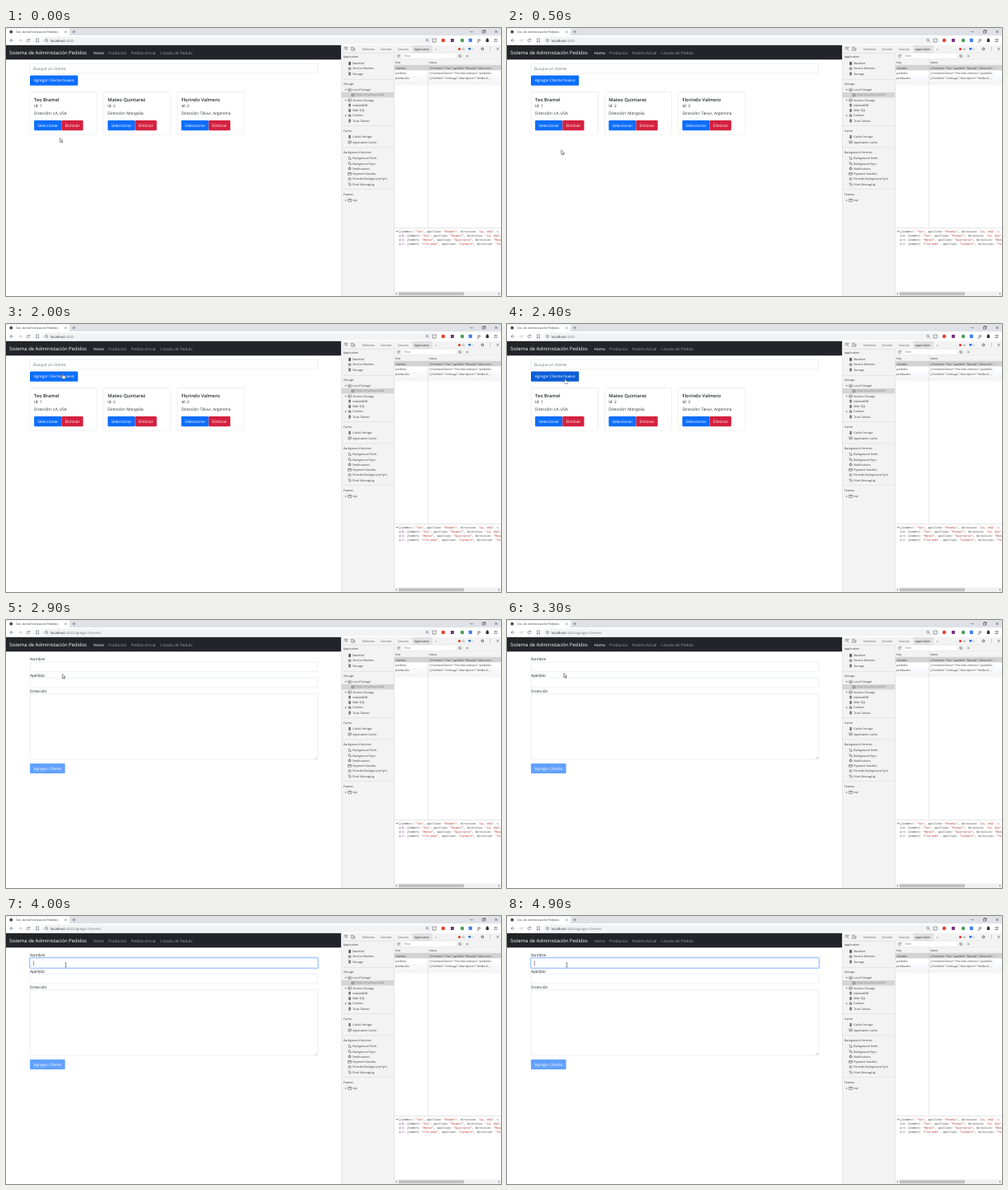
Recreate the animation shown at these times as an HTML page. Size 600x325 px, loop 5 s.

```html
<!DOCTYPE html>
<html lang="es">
<head>
<meta charset="utf-8">
<style>
html, body { margin: 0; width: 100%; height: 100%; overflow: hidden; background: #fff; }
svg { display: block; width: 100%; height: 100%; }
text { font-family: "Open Sans", "Noto Sans", sans-serif; text-rendering: geometricPrecision; white-space: pre; }
.mono { font-family: "Liberation Mono", "DejaVu Sans Mono", monospace; }
</style>
</head>
<body>
<svg id="stage" viewBox="0 0 600 325"></svg>
<script>
const BLUE = '#0d6efd', DARK = '#212529', MUTED = '#6c757d', ICON = '#5f6368';
const BASE = 4.72, TOOL = 3.5;

const rect = (x, y, w, h, fill, extra = '') =>
  `<rect x="${x}" y="${y}" width="${w}" height="${h}" fill="${fill}" ${extra}/>`;
const text = (x, y, str, size = BASE, fill = DARK, extra = '') =>
  `<text x="${x}" y="${y}" font-size="${size}" fill="${fill}" ${extra}>${str}</text>`;
const path = (d, stroke = ICON, width = .6, extra = '') =>
  `<path d="${d}" fill="none" stroke="${stroke}" stroke-width="${width}" ${extra}/>`;
const dot = (x, y, r, fill, extra = '') =>
  `<circle cx="${x}" cy="${y}" r="${r}" fill="${fill}" ${extra}/>`;
const ring = (x, y, r, stroke = ICON, width = .6) =>
  dot(x, y, r, 'none', `stroke="${stroke}" stroke-width="${width}"`);
const cross = (x, y, r, stroke = ICON) =>
  path(`M${x - r} ${y - r}l${2 * r} ${2 * r}m0 ${-2 * r}l${-2 * r} ${2 * r}`, stroke);
const box = (x, y, w, h, stroke, extra = '') =>
  rect(x, y, w, h, '#fff', `stroke="${stroke}" stroke-width=".4" ${extra}`);
const reload = (x, y, r) =>
  path(`M${x + r} ${y - r * .4}A${r} ${r} 0 1 0 ${x + r} ${y + r * .4}M${x + r} ${y - r}v${r * .8}h${-r * .8}`);
const button = (x, y, w, h, label, fill, extra = '', round = 1.2) =>
  rect(x, y, w, h, fill, `rx="${round}" ${extra}`) +
  text(x + w / 2, y + h / 2 + 1.7, label, BASE, '#fff', 'text-anchor="middle"');
const group = (id, body) => `<g id="${id}">${body}</g>`;

function browser() {
  const back = 'l-2 2l2 2M';
  return rect(0, 0, 600, 9.2, '#dee1e6') +
    path('M0 9.3V2Q0 .6 1.5 .6H75.5Q77 .6 77 2V9.3Z', 'none', 0, 'style="fill:#fff"') +
    rect(0, 9.2, 600, 11.6, '#fff') +
    dot(6.2, 4.7, 1.9, '#444') +
    text(12, 6, 'Sist. de Administación Pedidos', 3.62, '#3c4043') +
    cross(72.3, 4.7, 1.1) + path('M80.2 4.7h4M82.2 2.7v4') +
    path('M562.5 4.6h3.4M577.5 3.4h2.8v2.8h-2.8zM578.4 3.4v-.8h2.8v2.8h-.8', '#222', .45) +
    cross(594.2, 4.5, 1.3, '#222') +
    rect(43.5, 10.6, 480, 8.8, '#f1f3f4', 'rx="4.4"') +
    path(`M7 13${back}5 15h4.2`) + path('M17 13l2 2l-2 2M14.8 15h4.2', '#b4b7ba') +
    reload(27, 15, 1.8) +
    path('M36.6 12.8h3v4.6l-1.5-1.3l-1.5 1.3z') +
    ring(49, 15, 1.6, ICON, .5) + path('M49 14.8v1.1M49 14v.4', ICON, .5) +
    text(54, 16.5, 'localhost<tspan fill="#777">:4200<tspan id="route"></tspan></tspan>', 4.15, '#202124') +
    ring(510.3, 14.6, 1.3) + path('M511.2 15.6l1.3 1.3') +
    path('M518.5 13h-1.3v4h4v-1.3M519 13.2h2.2v2.2') +
    dot(530, 15, 2.3, '#e8432a') + rect(539, 13, 4, 4, '#7b3a86') +
    dot(553, 15, 2.2, '#4a9b58') + rect(560.8, 12.8, 4.2, 4.2, '#4285f4', 'rx=".5"') +
    text(571.5, 16.7, 'f?', 4.6, '#222', 'font-style="italic" font-weight="600"') +
    rect(581.7, 13.4, 3.5, 3.5, '#333', 'rx=".6"') + dot(583.4, 13.2, .9, '#333') +
    path('M591.5 13.5h4M591.5 15h4M591.5 16.5h4', '#333', .5);
}

function navbar() {
  const links = [[124, 'Productos'], [151.5, 'Pedido Actual'], [187, 'Listado de Pedido']];
  return rect(0, 20.8, 406.5, 17.5, DARK) +
    text(4, 32.2, 'Sistema de Administación Pedidos', 5.88, '#fff') +
    text(105.5, 31.8, 'Home', BASE, '#fff', 'id="home"') +
    links.map(([x, s]) => text(x, 31.8, s, BASE, '#9a9c9e')).join('');
}

const clients = [
  ['Teo', 'Bramel', 'LA, USA'],
  ['Mateo', 'Quintarez', 'Mongolia'],
  ['Florindo', 'Valmero', 'Talvur, Argentina']
];

function listPage() {
  const card = ([first, last, place], i) => {
    const x = 29.2 + i * 89.2;
    return box(x, 77.6, 81.2, 51.6, '#dcdcdc', 'rx="1"') +
      text(x + 4.9, 88.8, `${first} ${last}`, 5.65, DARK, 'font-weight="600"') +
      text(x + 4.9, 96.1, `Id: ${i + 1}`) +
      text(x + 4.9, 105.2, `Dirección: ${place}`) +
      button(x + 4.9, 112, 33.2, 12.3, 'Seleccionar', BLUE) +
      button(x + 38.1, 112, 26.2, 12.3, 'Eliminar', '#d4213f');
  };
  return box(29.2, 43.2, 348.6, 11.8, '#ced4da', 'rx="1"') +
    text(33, 51, 'Busque un cliente.', BASE, MUTED) +
    button(29, 57.6, 58.2, 12.2, 'Agregar Cliente Nuevo', BLUE, 'id="add"') +
    clients.map(card).join('');
}

function formPage() {
  return text(29, 49.2, 'Nombre') + text(29, 68.5, 'Apellido') + text(29, 87.8, 'Dirección') +
    rect(28.5, 50.4, 350, 13, 'none', 'id="glow" rx="1.5" stroke="#0d6efd" stroke-opacity=".35" stroke-width="1.3"') +
    box(29.2, 51.1, 348.6, 11.7, '#ced4da', 'id="field" rx="1"') +
    path('M33.5 54.2v6', '#222', .45, 'id="caret"') +
    box(29.2, 70.2, 348.6, 11.7, '#ced4da', 'rx="1"') +
    box(29.2, 89.8, 348.6, 79.2, '#ced4da', 'rx="1"') +
    path('M374.7 168.2l2.2-2.2M376 168.2l.9-.9', '#777', .35) +
    button(29, 174, 42.6, 12, 'Agregar Cliente', '#62a1fe');
}

// Sidebar rows: centre, label, icon kind, arrow
const sidebar = [
  [35, 'Application'], [43, 'Manifest', 'file'], [49.2, 'Service Workers', 'gear'], [55.5, 'Storage', 'db'],
  [67.5, 'Storage'], [75, 'Local Storage', 'grid', '▼'], [81.2, 'http://localhost:4200', 'grid'],
  [87.5, 'Session Storage', 'grid', '▶'], [93.7, 'IndexedDB', 'db'], [100, 'Web SQL', 'db'],
  [106.2, 'Cookies', 'gear', '▶'], [112.5, 'Trust Tokens', 'db'],
  [124.7, 'Cache'], [132, 'Cache Storage', 'db'], [138.3, 'Application Cache', 'grid'],
  [150.7, 'Background Services'], [158, 'Background Fetch', 'sync'], [164.3, 'Background Sync', 'sync'],
  [170.5, 'Notifications', 'gear'], [176.8, 'Payment Handler', 'card'],
  [183, 'Periodic Background Sync', 'clock'], [189.3, 'Push Messaging', 'sync'],
  [201.6, 'Frames'], [209, 'top', 'frame', '▶']
];

function icon(kind, x, y) {
  switch (kind) {
    case 'file': return rect(x - 1.3, y - 1.9, 2.7, 3.8, '#555');
    case 'gear': return ring(x, y, 1.3, '#555', 1);
    case 'db': return rect(x - 1.4, y - 1.9, 2.8, 3.8, '#666', 'rx="1"') + path(`M${x - 1.4} ${y - .6}h2.8m-2.8 1.3h2.8`, '#eee', .3);
    case 'grid': return path(`M${x - 1.8} ${y - 1.6}h3.6v3.2h-3.6zm0 1.2h3.6m0 1h-3.6m1.3-1v2`, '#666', .4);
    case 'sync': return path(`M${x - 1} ${y + 1.9}v-3.6m-.9 1l.9-1l.9 1M${x + 1} ${y - 1.5}v3.4m-.9-1l.9 1l.9-1`, '#555', .5);
    case 'card': return path(`M${x - 1.9} ${y - 1.4}h3.8v2.8h-3.8zm0 1h3.8`, '#555', .5);
    case 'clock': return ring(x, y, 1.6, '#555', .5) + path(`M${x} ${y - 1}v1.1h.8`, '#555', .4);
    default: return path(`M${x - 1.9} ${y - 1.6}h3.8v3.2h-3.8zm0 .8h3.8`, '#555', .5);
  }
}

function devtools() {
  const line = (x, y, w, h) => rect(x, y, w, h, '#cbcbcb');
  const tabs = [[432, 'Elements'], [454, 'Console'], [475, 'Sources'], [495, 'Application'], [520.5, '»']];
  const rows = [
    ['clientes', `[{"nombre":"${clients[0][0]}","apellido":"${clients[0][1]}","direccion"...`],
    ['pedidos', `[{"nombreCliente":"${clients[2][0]} ${clients[2][1]}","pedidoD...`],
    ['productos', '[{"nombre":"Lechuga","descripcion":"Verdura",...']
  ];
  const entry = ([first, last, place]) => `{nombre: "${first}", apellido: "${last}", direccion: "${place}", c`;
  const code = (x, y, str) => text(x, y, str.replace(/"[^"]*"/g, '<tspan fill="#a5201c">$&</tspan>'), 3.37, '#303030', 'class="mono"');
  const arrow = (x, y, down) =>
    `<path d="M${x} ${y}${down ? 'm-1.1 -.7h2.2l-1.1 1.7z' : 'm-.6 -1.1v2.2l1.6 -1.1z'}" fill="#666"/>`;

  return rect(406.5, 20.8, 193.5, 305, '#fff') +
    rect(406.5, 20.8, 193.5, 9.2, '#f3f3f3') + rect(406.5, 30, 64, 295, '#f3f3f3') +
    rect(492.5, 20.8, 24.5, 9.2, '#e2e2e2') +
    tabs.map(([x, s]) => text(x, 26.6, s, TOOL, s === 'Application' ? '#222' : '#555')).join('') +
    path('M410 26.5v-3.2h4v1.2M412 24.8l2.5 2.5M412 26.4v-1.6h1.6M418.6 23.2h2.3v4h-2.3zM421.2 24.5h1.6v2.7h-1.6', '#555', .5) +
    dot(549.5, 25.4, 1.5, '#d93025') + text(552, 26.7, '10', 3.3, '#555') +
    rect(560.5, 24, 2.9, 2.6, '#1a73e8', 'rx=".4"') + text(565, 26.7, '1', 3.3, '#555') +
    ring(577.5, 25.4, 1.3, '#555', 1) +
    [23.8, 25.4, 27].map(y => dot(587, y, .45, '#555')).join('') + cross(596, 25.4, 1.3, '#444') +
    line(406.5, 29.9, 193.5, .4) + line(406.3, 20.8, .4, 305) + line(470.4, 30, .4, 295) +
    [62, 118.5, 144.8, 195.5].map(y => line(406.5, y, 64, .35)).join('') +
    rect(406.5, 78.1, 64, 6.2, '#d5d5d5') +
    sidebar.map(([y, label, kind, mark]) => {
      const nested = label.startsWith('http') ? 4 : 0;
      return text((kind ? 420.2 : 409) + nested, y + 1.25, label, TOOL, nested ? '#777' : '#333') +
        (kind ? icon(kind, 416.6 + nested, y) : '') +
        (mark ? arrow(411.7, y, mark === '▼') : '');
    }).join('') +
    rect(470.8, 30.2, 130, 7.6, '#f3f3f3') + reload(475.8, 34, 1.4) +
    rect(480.5, 31, 64, 6, '#fff') + text(482.5, 35.3, 'Filter', TOOL, '#777') +
    ring(550.2, 34, 1.5, '#555', .5) + path('M549.2 33l2 2', '#555', .5) + cross(559.2, 34, 1.2) +
    line(470.8, 37.8, 130, .35) + rect(470.8, 38.1, 130, 6.8, '#f3f3f3') +
    text(472.3, 42.9, 'Key', TOOL, '#333') + text(513.3, 42.9, 'Value', TOOL, '#333') +
    line(470.8, 44.8, 130, .35) +
    rect(470.8, 45.1, 130, 6.2, '#d2d2d2') + rect(470.8, 57.5, 130, 6.2, '#f7f9fc') +
    rows.map(([key, value], i) =>
      text(472.3, 49.5 + i * 6.25, key, TOOL, '#303030') + text(513.3, 49.5 + i * 6.25, value, 3.38, '#303030')).join('') +
    rect(470.8, 63.8, 130, 5.5, '#f5f5f5') +
    line(511.6, 38, .4, 204.4) + line(470.8, 242.2, 130, .5) +
    arrow(474, 246.8, true) + code(476, 248, '[' + entry(clients[0])) +
    clients.map((c, i) => {
      const y = 252.1 + i * 5;
      return arrow(477.6, y, false) + code(480, y + 1.1, `<tspan fill='#881391'>${i}</tspan>: ` + entry(c));
    }).join('') +
    rect(470.8, 319.6, 130, 5.4, '#f1f1f1') + rect(476, 320.3, 79, 4, '#c1c1c1') +
    '<path d="M474 321l-1.5 1.3l1.5 1.3zM597 321l1.5 1.3l-1.5 1.3z" fill="#777"/>';
}

const cursors =
  group('arrow', '<path d="M0 0v5.2l1.2-1.1l.8 1.9l.9-.4l-.8-1.8h1.7z" fill="#fff" stroke="#111" stroke-width=".45"/>') +
  group('hand', '<path d="M-.6 .4q.6-.7 1.2 0v2.1l2.3.6q.7.3.5 1.2l-.6 1.9h-3l-1.9-2.4q0-.8.9-.5l.6.5z" fill="#fff" stroke="#111" stroke-width=".4"/>') +
  group('beam', path('M-1.1 -2.7q1.1 0 1.1.6v4.2q0 .6-1.1.6M1.1 -2.7q-1.1 0-1.1.6M0 2.1q0 .6 1.1.6', '#222', .5));

document.getElementById('stage').innerHTML = rect(0, 0, 600, 325, '#fff') + browser() + navbar() +
  group('list', listPage()) + group('form', formPage()) + devtools() + group('pointer', cursors);

const $ = id => document.getElementById(id);
const show = (id, on) => $(id).setAttribute('display', on ? 'inline' : 'none');

// Pointer stops: time, x, y
const stops = [
  [0, 65.4, 133.3], [100, 65.4, 133.3], [1100, 66.7, 175.3], [1500, 66.7, 175.3], [2000, 69, 60.3],
  [2100, 69, 60.3], [2400, 70.6, 66.2], [2700, 70.6, 66.2], [2900, 68.2, 65.5],
  [3200, 68.2, 65.5], [3600, 72.5, 59.4], [5000, 72.5, 59.4]
];

function pointerAt(t) {
  const i = stops.findIndex(s => t < s[0]);
  const [t0, x0, y0] = stops[i - 1], [t1, x1, y1] = stops[i];
  const k = (t - t0) / (t1 - t0), e = k * k * (3 - 2 * k);
  return [x0 + (x1 - x0) * e, y0 + (y1 - y0) * e];
}

function draw(now) {
  const t = Math.floor(now % 5000 / 100) * 100;
  const onForm = t >= 2700, focused = t >= 3500;
  const [x, y] = pointerAt(t);
  const overButton = !onForm && (y > 57 && y < 70 || y > 112 && y < 124.3);
  const overField = onForm && y < 62.8;

  show('list', !onForm);
  show('form', onForm);
  $('route').textContent = onForm ? '/agregar-Clientes' : '';
  $('add').setAttribute('fill', t >= 2100 ? '#0b5ed7' : BLUE);
  $('home').setAttribute('fill', focused ? '#9a9c9e' : '#fff');
  $('field').setAttribute('stroke', focused ? '#86b7fe' : '#ced4da');
  $('glow').setAttribute('opacity', Math.min(1, Math.max(0, (t - 3500) / 150)));
  show('caret', focused && (t < 4100 || t >= 4600));

  show('arrow', !overButton && !overField);
  show('hand', overButton);
  show('beam', overField);
  $('pointer').setAttribute('transform', `translate(${x} ${y})`);
  requestAnimationFrame(draw);
}
requestAnimationFrame(draw);
</script>
</body>
</html>
```
